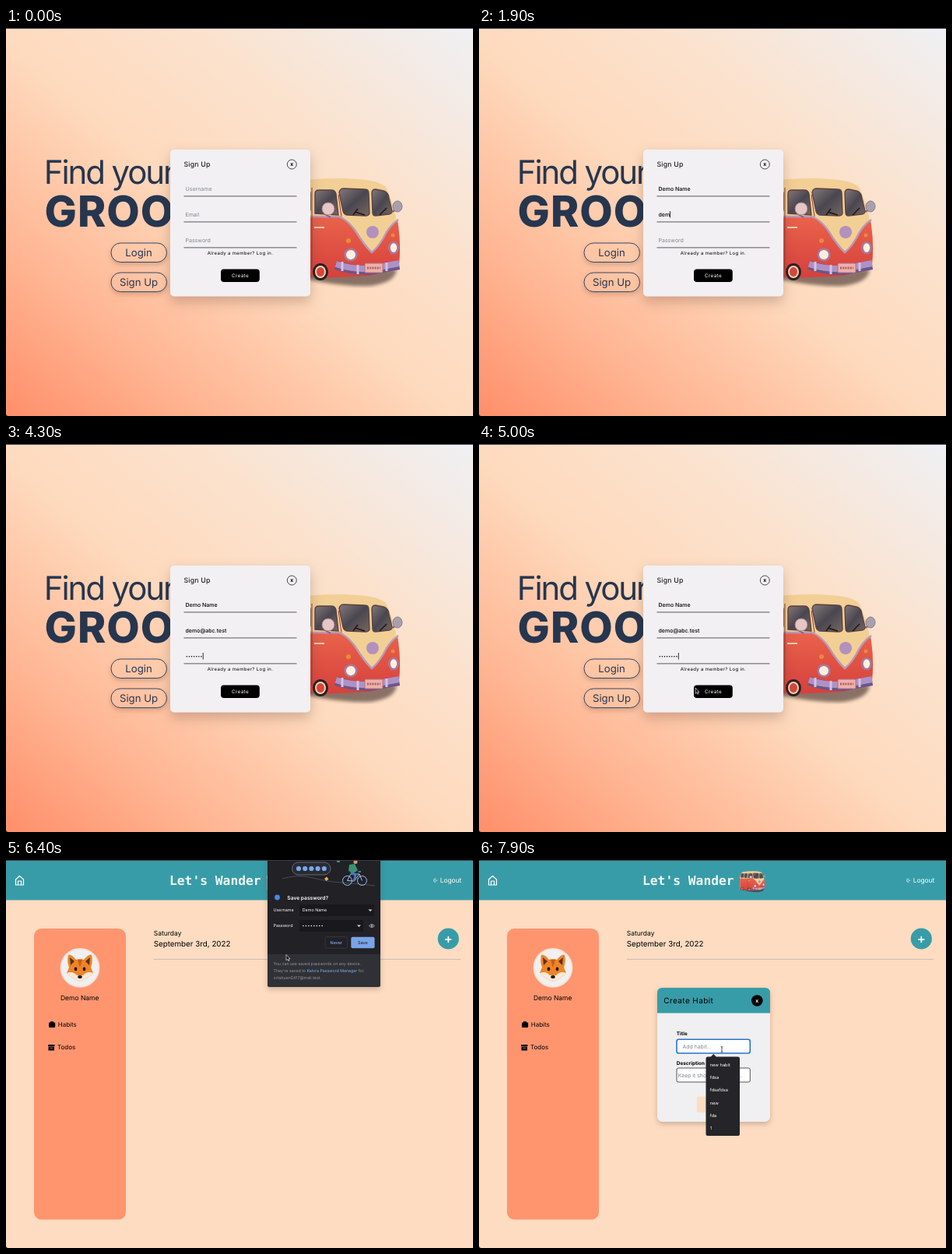
An HTML page that plays this animation: 600x498 px, repeating every 8 s.

```html
<!DOCTYPE html>
<html lang="en">
<head>
<meta charset="utf-8">
<title>Habit planner sign up</title>
<style>
  html, body { margin: 0; width: 100%; height: 100%; overflow: hidden; background: #111; }
  svg { display: block; width: 600px; height: 498px; border-bottom-left-radius: 3px; }
  text { font-family: Inter, Roboto, sans-serif; text-rendering: geometricPrecision; white-space: pre; }
  .mid { text-anchor: middle; }
  .navy { fill: #26364f; }
  .white { fill: #fff; }
  .hint { fill: #7d8792; }
  .bold { font-weight: 700; }
  .line { stroke: #333; stroke-width: .8; }
  .pill { fill: none; stroke: #34486a; stroke-width: 1; }
  .icon { fill: none; stroke: #fff; stroke-linecap: round; stroke-linejoin: round; }
  .soft { filter: drop-shadow(0 7px 8px rgba(70, 40, 30, .25)); }
  .lift { filter: drop-shadow(0 3px 3px rgba(70, 40, 30, .25)); }
</style>
</head>
<body>
<svg viewBox="0 0 600 498">
  <defs>
    <linearGradient id="sunset" gradientUnits="userSpaceOnUse" x1="55.2" y1="543.9" x2="544.8" y2="-45.9">
      <stop offset="0" stop-color="#ff8f6a"/>
      <stop offset=".22" stop-color="#ffb592"/>
      <stop offset=".48" stop-color="#fedabd"/>
      <stop offset=".7" stop-color="#fbe2cd"/>
      <stop offset="1" stop-color="#eff0f3"/>
    </linearGradient>
    <linearGradient id="glass" x1="0" y1="0" x2="1" y2="1">
      <stop offset="0" stop-color="#84797a"/>
      <stop offset=".5" stop-color="#4a4650"/>
      <stop offset="1" stop-color="#77675f"/>
    </linearGradient>
    <linearGradient id="paint" x1="0" y1="0" x2="0" y2="1">
      <stop offset="0" stop-color="#e9634b"/>
      <stop offset="1" stop-color="#d6403c"/>
    </linearGradient>
    <filter id="blur"><feGaussianBlur stdDeviation="2.2"/></filter>
    <symbol id="bus" viewBox="342 192 168 143">
      <path d="M352 314Q420 333 468 331Q500 327 502 310L360 306Z" fill="#3d2a25" opacity=".6" filter="url(#blur)"/>
      <path d="M343 240Q344 203 362 198Q410 191 452 194Q483 196 489 206Q500 228 504 262L505 300L470 318L344 312Z" fill="#f2cf95"/>
      <path d="M343 242L428 243Q438 246 448 259Q461 280 470 288Q480 280 489 262Q496 251 503 247Q508 275 505 304L470 318L402 321L345 312Z" fill="url(#paint)"/>
      <path d="M346 242H428Q438 246 448 259Q461 280 470 288Q480 280 489 262Q496 251 504 246" fill="none" stroke="#b79ab9" stroke-width="2.4"/>
      <g fill="url(#glass)" stroke="#5d4140" stroke-width="1.4">
        <rect x="349" y="209" width="19" height="27" rx="4"/>
        <rect x="372" y="208" width="19" height="29" rx="4"/>
        <path d="M397 213Q397 208 402 208H418Q423 208 424 213L427 240L397 238Z"/>
        <path d="M428 211Q429 206 434 206L461 207Q466 207 466 212L467 238Q466 241 462 241L438 240Q434 239 433 235Z"/>
        <path d="M470 212Q470 207 475 207L485 209Q489 210 491 214L496 235Q496 238 492 239L475 241Q471 241 471 237Z"/>
      </g>
      <path d="M393 205V310M427 214L431 242" stroke="#8d3e36" stroke-width="1" fill="none"/>
      <path d="M446 240L452 232M461 240L448 236M480 240L489 231" stroke="#1c171c" stroke-width="1.5"/>
      <path d="M396 256H409" stroke="#f4cdb4" stroke-width="2"/>
      <path d="M408 238L417 243M496 236L504 232" stroke="#7d6579" stroke-width="2"/>
      <circle cx="414" cy="232" r="8" fill="#e7c6c4" stroke="#9b8295"/>
      <ellipse cx="503" cy="229" rx="6" ry="7" fill="#aaa0ad" stroke="#877b8b"/>
      <circle cx="471" cy="262" r="8" fill="#b391bd"/>
      <g fill="#fff0df" stroke="#a77b9e" stroke-width="2.6">
        <circle cx="443" cy="291" r="7.3"/><ellipse cx="498" cy="282" rx="5.5" ry="7"/>
      </g>
      <g fill="#e98a38"><circle cx="440" cy="273" r="3"/><circle cx="497" cy="266" r="2.5"/></g>
      <path d="M424 304Q445 312 469 311L505 304" fill="none" stroke="#6d5584" stroke-width="12"/>
      <path d="M424 303Q445 310 469 309L505 302" fill="none" stroke="#ad92c6" stroke-width="8"/>
      <path d="M432 300V312M452 304V316M489 301V312" stroke="#d9c2dd" stroke-width="3"/>
      <rect x="461" y="302" width="23" height="12" rx="1" fill="#edb2ac" stroke="#b17084"/>
      <path d="M464 308H481" stroke="#b65e62" stroke-width="3" stroke-dasharray="2 1.2"/>
      <g id="wheel"><ellipse cx="404" cy="313" rx="10" ry="11" fill="#2b2024"/>
      <ellipse cx="404" cy="313" rx="7" ry="8" fill="#f1d4b2"/><ellipse cx="404" cy="313" rx="5" ry="6" fill="#d8463c"/></g>
      <use href="#wheel" x="-46" y="-4"/>
    </symbol>
  </defs>

  <g id="landing">
    <rect width="600" height="498" fill="url(#sunset)"/>
    <text class="navy" x="48.8" y="199.5" font-size="42" letter-spacing="-2.1">Find your</text>
    <text class="navy" x="49.5" y="254.8" font-size="55" font-weight="800" letter-spacing="1">GROOVE</text>
    <g class="lift" fill="url(#sunset)">
      <rect x="135" y="276" width="71.5" height="24.5" rx="12.2"/>
      <rect x="135" y="314" width="71.5" height="24.5" rx="12.2"/>
    </g>
    <rect class="pill" x="135" y="276" width="71.5" height="24.5" rx="12.2"/>
    <rect class="pill" x="135" y="314" width="71.5" height="24.5" rx="12.2"/>
    <g class="navy mid" font-size="13.2"><text x="170.5" y="293">Login</text><text x="170.5" y="331">Sign Up</text></g>
    <use href="#bus" x="342" y="192" width="168" height="143"/>
    <rect class="soft" x="211" y="156" width="180" height="188.5" rx="5" fill="#f2f0f2"/>
    <text x="228.5" y="178" font-size="8.8" letter-spacing=".2">Sign Up</text>
    <circle cx="367.3" cy="175" r="6" fill="none" stroke="#222" stroke-width=".8"/>
    <text class="mid bold" x="367.3" y="177.4" font-size="6.8">x</text>
    <path class="line" d="M228.5 215.9H373.5M228.5 248.9H373.5M228.5 281.9H373.5"/>
    <g id="fields" font-size="7"></g>
    <rect id="caret" width=".8" height="8.5"/>
    <text class="mid" x="301" y="290.6" font-size="6" letter-spacing=".35">Already a member? Log in.</text>
    <rect x="276" y="309.6" width="49.8" height="16.4" rx="4"/>
    <text class="mid white" x="301" y="320.2" font-size="6.3" letter-spacing=".4">Create</text>
  </g>

  <g id="board">
    <rect width="600" height="498" fill="#fddcc1"/>
    <rect width="600" height="51.5" fill="#389ca8"/>
    <path class="icon" d="M12.5 25L17.5 20.5L22.5 25V32H12.5ZM15.5 32V27H19.5V32" stroke-width="1.2"/>
    <text x="210" y="31.5" font-size="16.3" fill="#eff8f4" class="bold" style="font-family:'DejaVu Sans Mono',monospace">Let's Wander</text>
    <use href="#bus" x="335" y="14" width="33" height="28"/>
    <path class="icon" d="M552 24Q549.5 24 549.5 26.2T552 28.5M551.5 26.2H554" stroke-width=".7"/>
    <text class="white" x="557.7" y="29.2" font-size="8.4">Logout</text>

    <rect x="36" y="88" width="118" height="373.5" rx="9.5" fill="#ff956f"/>
    <circle cx="95" cy="138.3" r="24.6" fill="#f1eff0" stroke="#f4dfd2" stroke-width="1.6"/>
    <path d="M80 122Q83 120 90 128Q95 126 100 128Q107 120 110 122Q112 130 109 138L112 145Q104 153 95 156Q86 153 78 145L81 138Q78 130 80 122Z" fill="#ee8427"/>
    <path d="M82 125L88 130L83 135ZM108 125L102 130L107 135Z" fill="#5d3022"/>
    <path d="M78 145Q86 142 91 148H99Q104 142 112 145Q104 153 95 156Q86 153 78 145Z" fill="#f8e9d8"/>
    <path d="M92 128L95 138L98 128" fill="#c75d1c"/>
    <g fill="#231815"><ellipse cx="89.5" cy="140" rx="1.9" ry="2.4"/><ellipse cx="100.5" cy="140" rx="1.9" ry="2.4"/><ellipse cx="95" cy="150" rx="2.8" ry="2"/></g>
    <text class="mid" x="94.7" y="180.3" font-size="8.5">Demo Name</text>
    <path d="M57 208.5V207.3H61V208.5H62.2Q63.2 208.5 63.2 209.5V214Q63.2 215 62.2 215H56Q55 215 55 214V209.5Q55 208.5 56 208.5Z"/>
    <path d="M54 237H62.5V239H54ZM54.5 239.6H62V244.5H54.5Z"/><path d="M57 241.4H59.7" stroke="#ff956f" stroke-width=".8"/>
    <g font-size="8"><text x="66.7" y="214.2">Habits</text><text x="66" y="243.2">Todos</text></g>
    <text x="189.7" y="97" font-size="8.5">Saturday</text>
    <text x="189.7" y="111.4" font-size="9.8">September 3rd, 2022</text>
    <path d="M190 127.5H584" stroke="#c8bdb8"/>
    <circle cx="568.3" cy="101" r="13.6" fill="#389ca8"/>
    <path class="icon" d="M565 102H571.6M568.3 98.7V105.3" stroke-width="1.8"/>
  </g>

  <g id="popup" class="lift">
    <rect x="336" y="-6" width="145" height="169" rx="3" fill="#212126"/>
    <path d="M336 121H481V160Q481 163 478 163H339Q336 163 336 160Z" fill="#303136"/>
    <path d="M355 24Q375 18 394 23T430 29T474 33" fill="none" stroke="#5b5e66" stroke-width=".7"/>
    <rect x="367.5" y="3" width="49.5" height="16" rx="8" fill="#292b32" stroke="#747985" stroke-width=".8"/>
    <path d="M376 11H409" stroke="#7ca6e9" stroke-width="6.2" stroke-linecap="round" stroke-dasharray="0 8.2"/>
    <circle cx="427" cy="1" r="2.2" fill="#3f9a72"/>
    <path d="M409 24L412 21.5L414.5 24.5L411.5 27Z" fill="#e2b252"/>
    <g fill="none" stroke="#9fc2f1" stroke-width="1">
      <circle cx="438.5" cy="26.5" r="6"/><circle cx="457.5" cy="26.5" r="6"/>
      <path d="M438.5 26.5L443 18H454L447.5 27Z M454 18L457.5 26.5M452.5 15H456"/>
    </g>
    <path d="M441 6L448 5L452 13L447 17L440 14Z" fill="#3b9171"/>
    <path d="M443 15L449 20L447 27" fill="none" stroke="#4b78c6" stroke-width="2.6"/>
    <circle cx="449" cy="2.5" r="2.5" fill="#d59b7f"/>
    <circle cx="348.5" cy="48" r="3.4" fill="#4d86e4"/>
    <text class="white" x="361.3" y="50.5" font-size="6.7" font-weight="600">Save password?</text>
    <rect x="377" y="57" width="96" height="15" rx="1.5" fill="#19191d"/>
    <rect x="377" y="77" width="82" height="15" rx="1.5" fill="#19191d"/>
    <g class="white" font-size="5.4">
      <text x="343.5" y="66.4">Username</text><text x="343.5" y="86.4">Password</text><text x="380.7" y="66.4">Demo Name</text>
    </g>
    <path d="M382 84.5H407" stroke="#fff" stroke-width="1.6" stroke-linecap="round" stroke-dasharray="0 3.45"/>
    <path d="M465.5 63.5H470.5L468 66ZM451 83.5H456L453.5 86Z" fill="#d9dbe0"/>
    <path d="M466.5 84.5Q470 80.5 473.5 84.5Q470 88.5 466.5 84.5Z" fill="none" stroke="#aeb1b8" stroke-width=".9"/><circle cx="470" cy="84.5" r="1.2" fill="#aeb1b8"/>
    <rect x="410" y="98.7" width="28.5" height="14.5" rx="2" fill="none" stroke="#3a3d45" stroke-width=".8"/>
    <rect x="443.3" y="98.7" width="30.3" height="14.5" rx="2" fill="#7aa4e6"/>
    <g class="mid" font-size="5.4" font-weight="500"><text x="424.3" y="108" fill="#84adee">Never</text><text x="458.4" y="108" fill="#20252f">Save</text></g>
    <g font-size="5.25" fill="#96989f">
      <text x="343.5" y="134.5">You can use saved passwords on any device.</text>
      <text x="343.5" y="143.8">They're saved to <tspan fill="#7fb0ef">Kelvra Password Manager</tspan> for</text>
      <text x="343.5" y="153">ortahuen0417@mail.test.</text>
    </g>
  </g>

  <g id="habit">
    <rect class="lift" x="229" y="164" width="145" height="172" rx="6.5" fill="#f0eff1"/>
    <path d="M229 196.5V170.5Q229 164 235.5 164H367.5Q374 164 374 170.5V196.5Z" fill="#389ca8"/>
    <text x="237.3" y="184.3" font-size="10" letter-spacing=".4">Create Habit</text>
    <circle cx="357.3" cy="180.5" r="7.3"/>
    <text class="mid white bold" x="357.3" y="182.9" font-size="6.8">x</text>
    <g class="bold" font-size="6.4"><text x="253.8" y="225.3">Title</text><text x="253.8" y="262.5">Description</text></g>
    <rect id="titleBox" x="254" y="230.3" width="94.3" height="17.7" rx="2.5" fill="#fff"/>
    <rect x="254" y="267" width="94.3" height="18" rx="2" fill="#fff" stroke="#444" stroke-width=".9"/>
    <g class="hint" font-size="6.9"><text x="261.5" y="242">Add habit...</text><text x="255.8" y="278.6">Keep it short and sweet...</text></g>
    <rect x="280" y="303.5" width="43" height="20.5" rx="2" fill="#fddcc1"/>
    <text class="mid" x="301.5" y="316.2" font-size="6">Add</text>
    <g id="recent">
      <path d="M297.5 253L301.3 249L305 253Z" fill="#242429"/>
      <rect x="291.5" y="252.5" width="43.5" height="101.5" rx="2.5" fill="#242429"/>
    </g>
  </g>
  <path id="arrow" d="M0 0V7.2L1.7 5.8L2.8 8.2L4 7.6L2.9 5.3H5Z" fill="#111" stroke="#fff" stroke-width=".6"/>
  <path id="beam" d="M-1.3 -3.5Q0 -3.5 0 -2.5Q0 -3.5 1.3 -3.5M0 -2.5V2.5M-1.3 3.5Q0 3.5 0 2.5Q0 3.5 1.3 3.5" fill="none" stroke="#222" stroke-width=".8"/>
  <path d="M0 .5H600" stroke="#373b49"/>
</svg>
<script>
const LOOP = 8000, STEP = 100;
const POINTER = 4600, BOARD = 5100, POPUP = 5600, POPUP_END = 6700, HABIT = 7100, BEAM = 7500, FOCUS = 7700;
const NS = "http://www.w3.org/2000/svg";
const $ = id => document.getElementById(id);
const show = (id, on) => $(id).style.display = on ? "" : "none";

function make(tag, attrs, parent) {
  const el = document.createElementNS(NS, tag);
  for (const key in attrs) el.setAttribute(key, attrs[key]);
  return parent.appendChild(el);
}

const fields = [
  { hint: "Username", value: "Demo Name", y: 209, focus: 200, start: 400, gap: 110 },
  { hint: "Email", value: "demo@abc.test", y: 242, focus: 1500, start: 1700, gap: 100 },
  { hint: "Password", value: "•".repeat(8), y: 275, focus: 3000, start: 3300, gap: 155, secret: true }
];
for (const f of fields) {
  f.text = make("text", { x: 230.5, y: f.y }, $("fields"));
  if (f.secret) f.dots = f.value.split("").map((_, i) =>
    make("circle", { cx: 232.3 + i * 3.1, cy: f.y - 2.2, r: .8 }, $("fields")));
}

["new habit", "fdsa", "fdsafdsa", "new", "fda", "1"].forEach((word, i) =>
  make("text", { x: 296.7, y: 265 + i * 16.2, class: "white", "font-size": 5.7 }, $("recent")).textContent = word);

// time, x, y of the pointer: Create, Never, plus button, title field
const route = [
  [4500, 258, 280], [4900, 278, 313], [5300, 278, 313], [6300, 360, 121.5], [6400, 360, 121.5],
  [6600, 424, 105], [6700, 424, 105], [7000, 568, 101], [7100, 568, 101], [7600, 312, 243], [8000, 312, 243]
];

function pointerAt(t) {
  const i = Math.max(1, route.findIndex(p => p[0] >= t));
  const [a, b] = [route[i - 1], route[i]];
  const k = Math.max(0, (t - a[0]) / (b[0] - a[0]));
  const e = k * (2 - k);
  return [a[1] + (b[1] - a[1]) * e, a[2] + (b[2] - a[2]) * e];
}

function drawForm(t) {
  const active = fields.filter(f => t >= f.focus).pop();
  $("caret").style.display = active ? "" : "none";
  for (const f of fields) {
    const n = t < f.start ? 0 : Math.min(f.value.length, 1 + Math.floor((t - f.start) / f.gap));
    f.text.textContent = n ? (f.secret ? "" : f.value.slice(0, n)) : f.hint;
    f.text.setAttribute("class", n ? "" : "hint");
    f.text.setAttribute("font-weight", n ? 500 : 400);
    if (f.dots) f.dots.forEach((d, i) => d.style.display = i < n ? "" : "none");
    if (f === active) {
      const width = !n ? 0 : f.secret ? n * 3.1 + .7 : f.text.getComputedTextLength();
      $("caret").setAttribute("x", 230.4 + width);
      $("caret").setAttribute("y", f.y - 7);
    }
  }
}

function draw(t) {
  const board = t >= BOARD, focused = t >= FOCUS, beam = t >= BEAM;
  show("landing", !board);
  show("board", board);
  show("popup", t >= POPUP && t < POPUP_END);
  show("habit", t >= HABIT);
  show("recent", focused);
  $("titleBox").setAttribute("stroke", focused ? "#2874c7" : "#444");
  $("titleBox").setAttribute("stroke-width", focused ? 1.6 : .9);
  if (!board) drawForm(t);
  const [x, y] = pointerAt(t);
  show("arrow", t >= POINTER && !beam);
  show("beam", beam);
  $(beam ? "beam" : "arrow").setAttribute("transform", `translate(${x} ${y})`);
}

const origin = performance.now();
function tick() {
  const t = (performance.now() - origin) % LOOP;
  draw(Math.floor(t / STEP) * STEP);
  requestAnimationFrame(tick);
}
tick();
</script>
</body>
</html>
```
